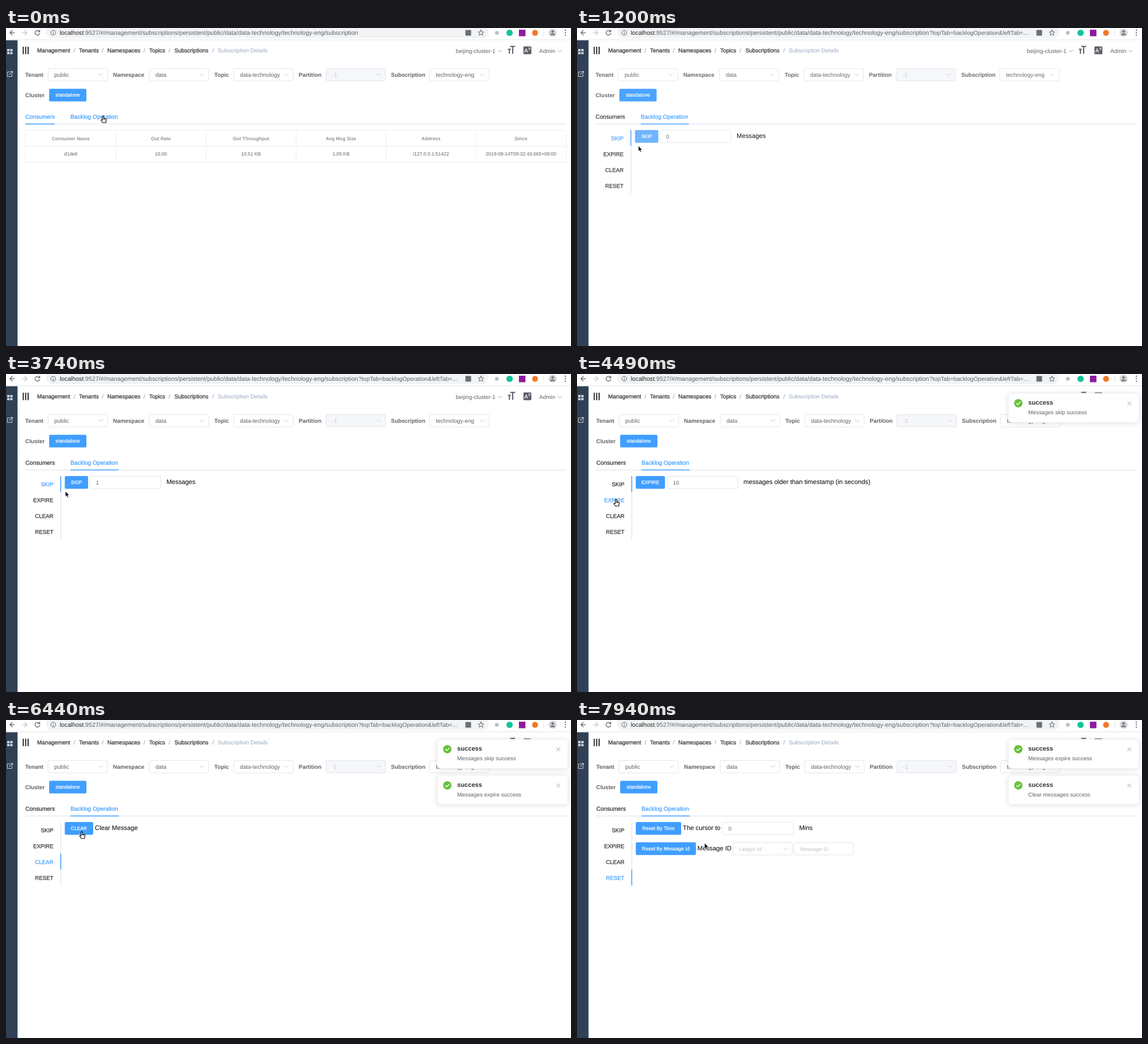
These frames come from a looping animation (998x561 px, 8 s). An HTML page:

```html
<!DOCTYPE html>
<html lang="en">
<head>
<meta charset="utf-8">
<title>Subscription details</title>
<style>
html, body { margin: 0; width: 100%; height: 100%; overflow: hidden; background: #fff; }
svg { display: block; width: 998px; height: 561px; }
text {
  font-family: "Liberation Sans", Arial, sans-serif;
  font-size: 9.95px;
  text-rendering: geometricPrecision;
  stroke-width: 0;
  white-space: pre;
}
.dark { fill: #303133; stroke: #303133; }
.gray { fill: #606266; stroke: #606266; }
.pale { fill: #c0c4cc; stroke: #c0c4cc; }
.blue { fill: #409eff; stroke: #409eff; }
.white { fill: #fff; stroke: #fff; }
.medium { stroke-width: .25px; }
.bold { font-weight: 700; }
.link { font-size: 10px; }
.tab { font-size: 10.2px; }
.side { font-size: 9.75px; text-anchor: end; }
.btn { font-size: 8.8px; text-anchor: middle; }
.caps { font-size: 8.45px; }
.val { font-size: 9.45px; }
.note { font-size: 11.28px; fill: #000; }
.head { font-size: 8.43px; font-weight: 700; fill: #909399; text-anchor: middle; }
.cell { font-size: 8.52px; fill: #606266; text-anchor: middle; }
.url { font-size: 10.68px; fill: #5f6368; }
.query { font-size: 10.25px; }
.line { fill: none; stroke-linecap: round; stroke-linejoin: round; }
.card { fill: #fff; stroke: #ebeef5; stroke-width: .8px; filter: drop-shadow(0 1.4px 4px rgba(0, 0, 0, .13)); }
</style>
</head>
<body>
<svg id="stage" viewBox="0 0 998 561"></svg>
<script>
const LOOP = 8000;

// ---- markup helpers ----
const text = (x, y, str, cls, extra = '') => `<text x="${x}" y="${y}" class="${cls}" ${extra}>${str}</text>`;
const rect = (x, y, w, h, fill, extra = '') => `<rect x="${x}" y="${y}" width="${w}" height="${h}" fill="${fill}" ${extra}/>`;
const line = (d, color, width = 1, extra = '') => `<path class="line" d="${d}" stroke="${color}" stroke-width="${width}" ${extra}/>`;
const disc = (x, y, r, fill) => `<circle cx="${x}" cy="${y}" r="${r}" fill="${fill}"/>`;
const group = (id, ...parts) => `<g id="${id}">${parts.join('')}</g>`;

const box = (x, y, w, fill = '#fff', extra = '') => rect(x, y + .4, w, 21.8, fill, `rx="2.6" stroke="#dcdfe6" stroke-width=".8" ${extra}`);
const chevron = (x, y, color = '#c0c4cc', s = 3.6) => line(`M${x - s} ${y - s / 2}l${s} ${s}l${s} ${-s}`, color, .9);
const select = (x, y, str, cls = 'gray', fill) =>
  box(x, y, 105, fill) + text(x + 11, y + 14.8, str, cls) + chevron(x + 93, y + 11.3);
const button = (x, y, w, str, cls = '', id = '') =>
  rect(x, y, w, 22.4, '#409eff', `rx="2.2" ${id && `id="${id}"`}`) + text(x + w / 2, y + 14, str, `white medium btn ${cls}`);

// ---- browser bar ----
const browserBar = () => [
  rect(0, 0, 998, 21, '#fff'),
  rect(71, -6, 781, 24, '#f1f3f4', 'rx="11"'),
  rect(0, 20.4, 998, .9, '#dfe1e4'),
  line('M15 8.3H7M11 4.3L7 8.3L11 12.3', '#5f6368', 1.3),
  line('M29 8.3H37M33 4.3L37 8.3L33 12.3', '#c3c6c9', 1.3),
  line('M58.8 5.6A4.2 4.2 0 1 0 59.6 9.4M59.6 3.6V6.6H56.6', '#5f6368', 1.3),
  line('M79.2 8.3a4.3 4.3 0 1 0 8.6 0a4.3 4.3 0 1 0 -8.6 0M83.5 8V10.5M83.5 6V6.1', '#5f6368', 1),
  text(95, 12, '<tspan fill="#202124">localhost</tspan>:9527/#/management/subscriptions/persistent/public/data/data-technology/technology-eng/subscription', 'url'),
  text(622.5, 12, '?topTab=backlogOperation&amp;leftTab=…', 'url query', 'id="query"'),
  rect(811.5, 3.5, 10, 10, '#6b6f74', 'rx="1"'),
  line('M839 3.4L840.4 6.8L844 7L841.2 9.3L842.2 12.8L839 10.9L835.8 12.8L836.8 9.3L834 7L837.6 6.8Z', '#5f6368', 1),
  disc(867, 8.5, 3.3, '#b9bcc0'),
  disc(889.5, 8.5, 5.6, '#15c39a'),
  rect(906, 3, 11.5, 11.5, '#8d1b9f'),
  disc(934.5, 8.5, 5.2, '#f07a28'),
  rect(949.5, 2.5, .8, 12, '#d5d7da'),
  disc(965.5, 8.3, 7, '#d3d5d9'),
  disc(965.5, 6.3, 2.3, '#74787e'),
  '<path d="M961 12.4Q961.4 9.6 965.5 9.6T970 12.4Z" fill="#74787e"/>',
  ...[4, 8.3, 12.6].map(y => disc(988, y, 1.15, '#5f6368'))
].join('');

// ---- application frame ----
const crumbs = [[55, 'Management'], [129, 'Tenants'], [179, 'Namespaces'], [253, 'Topics'], [297.5, 'Subscriptions']];
const slashes = [119.5, 169.5, 243, 287.3, 364.5];

const frame = () => [
  rect(0, 21.5, 20.4, 540, '#304156'),
  ...[[2, 37], [7.4, 37], [2, 42.2], [7.4, 42.2]].map(([x, y]) => rect(x, y, 4.3, 4.1, '#c9d4e0', 'rx=".6"')),
  line('M6.5 77.5H2.5V85.5H10.5V81.5M8 76.5H11.6V80M11.4 76.7L6 82', '#bfcbd9', 1.1),
  ...[29.6, 33.9, 38.2].map(x => rect(x, 33, 1.8, 13.2, '#1a1a1a')),
  ...crumbs.map(([x, s]) => text(x, 43, s, 'dark link medium')),
  ...slashes.map(x => text(x, 43, '/', 'link medium', 'fill="#a9adb5" stroke="#a9adb5"')),
  text(374, 43, 'Subscription Details', 'link', 'fill="#97a8be"'),
  text(794.5, 43.6, 'beijing-cluster-1', 'gray'),
  chevron(872.5, 40.8, '#8a8d93', 3.2),
  line('M890.6 32.6H899.4M895 32.6V45.4M886.6 37.6H891.8M889.2 37.6V45.4', '#5a5e66', 2, 'style="stroke-linecap:butt"'),
  rect(914, 32.4, 14, 13.8, '#5a5e66', 'rx="1.6"'),
  text(915.6, 43.4, 'A', 'white medium', 'style="font-size:9.5px"'),
  line('M922.6 35.6H926.6M924.6 34.6V35.6M926 36L923 39.2M923.4 36.6L926.4 39.2', '#fff', .7),
  text(942, 43.6, 'Admin', 'gray'),
  chevron(978, 40.8, '#8a8d93', 3.2)
].join('');

// ---- page content ----
const fields = () => [
  text(34, 85.8, 'Tenant', 'gray bold'), select(74.3, 71, 'public'),
  text(189, 85.8, 'Namespace', 'gray bold'), select(253, 71, 'data'),
  text(368, 85.8, 'Topic', 'gray bold'), select(402.2, 71, 'data-technology'),
  text(517, 85.8, 'Partition', 'gray bold'), select(565.3, 71, '-1', 'pale', '#f5f7fa'),
  text(680, 85.8, 'Subscription', 'gray bold'), select(748.2, 71, 'technology-eng'),
  text(34, 121.6, 'Cluster', 'gray bold'), button(76.2, 107.2, 65.8, 'standalone'),
  rect(34, 168.8, 955.5, 1.2, '#dfe4ed'),
  text(34.2, 160, 'Consumers', 'tab medium', 'id="consumers"'),
  text(114, 160, 'Backlog Operation', 'tab medium blue'),
  rect(34, 168.6, 52, 1.5, '#409eff', 'id="underline"')
].join('');

const columns = [
  [114.5, 'Consumer Name', 'd1de6'], [273.7, 'Out Rate', '10.00'], [432.8, 'Out Throughput', '10.51 KB'],
  [591.8, 'Avg Msg Size', '1.05 KB'], [750.6, 'Address', '/127.0.0.1:51422'],
  [909.6, 'Since', '2019-08-14T09:32:43.665+08:00']
];
const table = () =>
  line('M34.5 180.5H989.5V236.5H34.5ZM34.5 208.5H989.5' + [0, 1, 2, 3, 4].map(i => `M${194.5 + i * 159} 180.5V236.5`).join(''), '#ebeef5', .9) +
  columns.map(([x, h, c]) => text(x, 198, h, 'head') + text(x, 225, c, 'cell')).join('');

const sideTabs = ['SKIP', 'EXPIRE', 'CLEAR', 'RESET'];
const side = () =>
  rect(96, 180, 1.4, 112, '#e4e7ed') +
  rect(95.9, 180, 1.5, 28, '#409eff', 'id="bar"') +
  sideTabs.map((s, i) => text(83.7, 197.6 + i * 28, s, 'side medium', `id="side${i}"`)).join('');

const panels = [
  button(103.8, 180, 41.2, 'SKIP', 'caps', 'skipBtn') + box(148, 180, 125, '#fff', 'id="skipBox"') +
    text(158.8, 194.8, '0', 'gray val', 'id="skipVal"') + rect(162.5, 185.5, .8, 11.5, '#333', 'id="caret"') +
    text(283.4, 194.3, 'Messages', 'note'),
  button(103.8, 180, 51.6, 'EXPIRE', 'caps') + box(159.4, 180, 125, '#fff') + text(169.8, 194.8, '10', 'gray val') +
    text(294, 194.3, 'messages older than timestamp (in seconds)', 'note'),
  button(103.8, 180, 50.2, 'CLEAR', 'caps') + text(157, 194.3, 'Clear Message', 'note'),
  button(103.8, 180, 80.2, 'Reset By Time') + text(187, 194.3, 'The cursor to', 'note') +
    box(257.2, 180, 125, '#fff') + text(267.6, 194.8, '0', 'gray val') + text(392.4, 194.3, 'Mins', 'note') +
    button(103.8, 215.8, 106.2, 'Reset By Message Id') + text(212.8, 230.2, 'Message ID', 'note') +
    select(275.3, 215.8, 'Ledger Id', 'pale val') + box(383.3, 215.8, 104.6, '#fff') + text(394.2, 230.6, 'Message ID', 'pale val')
];

// ---- toasts and pointer ----
const toasts = [
  { msg: 'Messages skip success', start: 3790 },
  { msg: 'Messages expire success', start: 5500 },
  { msg: 'Clear messages success', start: 6740 }
];
const toast = ({ msg }, i) => group('toast' + i,
  '<rect class="card" x="762" y="34" width="230.4" height="51.4" rx="5.4"/>',
  disc(779.5, 51.6, 7.4, '#67c23a'),
  line('M776.2 51.8L778.6 54.1L782.9 49.6', '#fff', 1.4),
  text(797, 54.2, 'success', 'dark bold', 'style="font-size:11.15px"'),
  text(797, 71, msg, 'gray', 'style="font-size:9.88px"'),
  line('M972.6 48.8l6 6m0-6l-6 6', '#909399', .9));

const pointers = {
  hand: '<path d="M-1.2 0Q0-1.7 1.2 0V3.3L4.6 4Q6 4.4 5.8 6L5 9.4V11H-.8L-3.4 7.2Q-4 5.7-2.6 5.7L-1.2 6.6ZM1.2 3.3V5.4M3 4V5.6" fill="#fff" stroke="#000" stroke-width="1.1" stroke-linejoin="round"/>',
  arrow: '<path d="M0 0V9.6L2.2 7.6L3.8 11.2L5.3 10.5L3.7 7H6.8Z" fill="#000" stroke="#fff" stroke-width=".6"/>',
  beam: line('M-2.2-5.2Q0-5.2 0-4V4Q0 5.2-2.2 5.2M2.2-5.2Q0-5.2 0-4M0 4Q0 5.2 2.2 5.2M-1.2 2H1.2', '#222', 1)
};
const path = [
  [0, 'hand', 171.5, 156], [750, 'hand', 163, 164], [900, 'arrow', 150, 178], [1050, 'arrow', 120, 196],
  [1200, 'arrow', 108.5, 208], [1350, 'arrow', 120, 205], [1500, 'beam', 152, 199], [1650, 'beam', 170, 202],
  [1800, 'beam', 177.5, 203.5], [3140, 'beam', 165, 200], [3290, 'hand', 135, 196], [3440, 'hand', 128, 194],
  [3740, 'arrow', 105, 207], [3890, 'hand', 75, 216], [4040, 'hand', 68.8, 222], [4640, 'hand', 75, 219],
  [4790, 'arrow', 100, 208], [4940, 'hand', 122, 197], [5090, 'hand', 130, 194.5], [5540, 'arrow', 105, 214],
  [5690, 'hand', 78, 238], [5840, 'hand', 67, 249], [6290, 'arrow', 100, 222], [6440, 'hand', 133.8, 198],
  [6740, 'arrow', 112, 224], [6890, 'hand', 82, 256], [7040, 'hand', 67, 272], [7190, 'hand', 66.5, 277],
  [7790, 'arrow', 140, 256], [7940, 'arrow', 225.3, 217]
];

document.getElementById('stage').innerHTML = [
  rect(0, 0, 998, 561, '#fff'),
  group('page', fields(), group('table', table()), group('ops', side(), ...panels.map((p, i) => group('panel' + i, p)))),
  frame(), browserBar(),
  rect(0, 21.4, 998, 1.6, '#2299dd', 'id="progress"'),
  ...toasts.map(toast),
  group('pointer', ...Object.keys(pointers).map(k => group(k, pointers[k])))
].join('');

// ---- timing ----
const el = id => document.getElementById(id);
const set = (id, attrs) => { for (const k in attrs) el(id).setAttribute(k, attrs[k]); };
const show = (id, on) => { el(id).style.display = on ? '' : 'none'; };
const move = (id, x, y) => set(id, { transform: `translate(${x} ${y})` });
const clamp = v => Math.min(1, Math.max(0, v));

function bezier(x1, y1, x2, y2) {
  const at = (a, b, u) => 3 * a * u * (1 - u) ** 2 + 3 * b * u * u * (1 - u) + u ** 3;
  return x => {
    if (x <= 0 || x >= 1) return clamp(x);
    let lo = 0, hi = 1;
    for (let i = 0; i < 24; i++) {
      const mid = (lo + hi) / 2;
      if (at(x1, x2, mid) < x) lo = mid; else hi = mid;
    }
    return at(y1, y2, lo);
  };
}
const ease = bezier(.25, .1, .25, 1);
const easeBar = bezier(.645, .045, .355, 1);

const tick = t => {
  const shift = t < 2090 ? 0 : 140;
  return Math.floor((t - shift) / 150) * 150 + shift;
};

const LEAVE = 257, ENTER = 855, CLOSE = 6990;
const picks = [0, 4490, 6140, 7640];
const hovers = [[3890, 1], [5690, 2], [7040, 3]];

function drawPage(t) {
  const entered = t >= ENTER;
  const p = ease(clamp((t - (entered ? ENTER : LEAVE)) / 500));
  move('page', 21.3 * (entered ? p - 1 : p), 0);
  set('page', { opacity: entered ? p : 1 - p });
  show('table', !entered);
  show('ops', entered);
  el('consumers').setAttribute('class', 'tab medium ' + (entered ? 'dark' : 'blue'));
  set('underline', entered ? { x: 114, width: 85 } : { x: 34, width: 52 });
  show('query', t >= 300);
  show('progress', t >= 300 && t < 750);
  set('progress', { width: t < 450 ? 300 : 998, opacity: t < 600 ? 1 : .4 });
}

function drawTabs(t) {
  const active = picks.filter(s => t >= s).length - 1;
  const over = hovers.filter(([s, i]) => t >= s && t < picks[i]).map(h => h[1]);
  panels.forEach((_, i) => {
    show('panel' + i, i === active);
    el('side' + i).setAttribute('class', 'side medium ' + (i === active || over.includes(i) ? 'blue' : 'dark'));
  });
  const p = active ? easeBar(clamp((t - picks[active]) / 300)) : 1;
  move('bar', 0, 28 * (active - 1 + p));

  const focus = t >= 2090 && t < 3590;
  set('skipBox', { stroke: !focus ? '#dcdfe6' : t < 2240 ? '#8ebef2' : '#409eff' });
  set('skipBtn', { fill: t >= 1050 && t < 1350 ? '#66b1ff' : '#409eff' });
  el('skipVal').textContent = t < 2990 ? '0' : '1';
  show('caret', focus);
}

function drawToasts(t) {
  const lift = ease(clamp((t - CLOSE) / 300));
  toasts.forEach(({ start }, i) => {
    const p = ease(clamp((t - start) / 300));
    const alpha = i ? p : p * (1 - lift);
    show('toast' + i, alpha > 0);
    set('toast' + i, { opacity: alpha });
    move('toast' + i, 236 * (1 - p), 63.7 * (i ? i - lift : 0));
  });
}

function drawPointer(t) {
  const [, kind, x, y] = path.filter(s => t >= s[0]).pop();
  for (const k in pointers) show(k, k === kind);
  move('pointer', x, y);
}

function draw(now) {
  const t = tick(Math.max(0, now - begin) % LOOP);
  drawPage(t);
  drawTabs(t);
  drawToasts(t);
  drawPointer(t);
  requestAnimationFrame(draw);
}
const begin = performance.now();
draw(begin);
</script>
</body>
</html>
```
